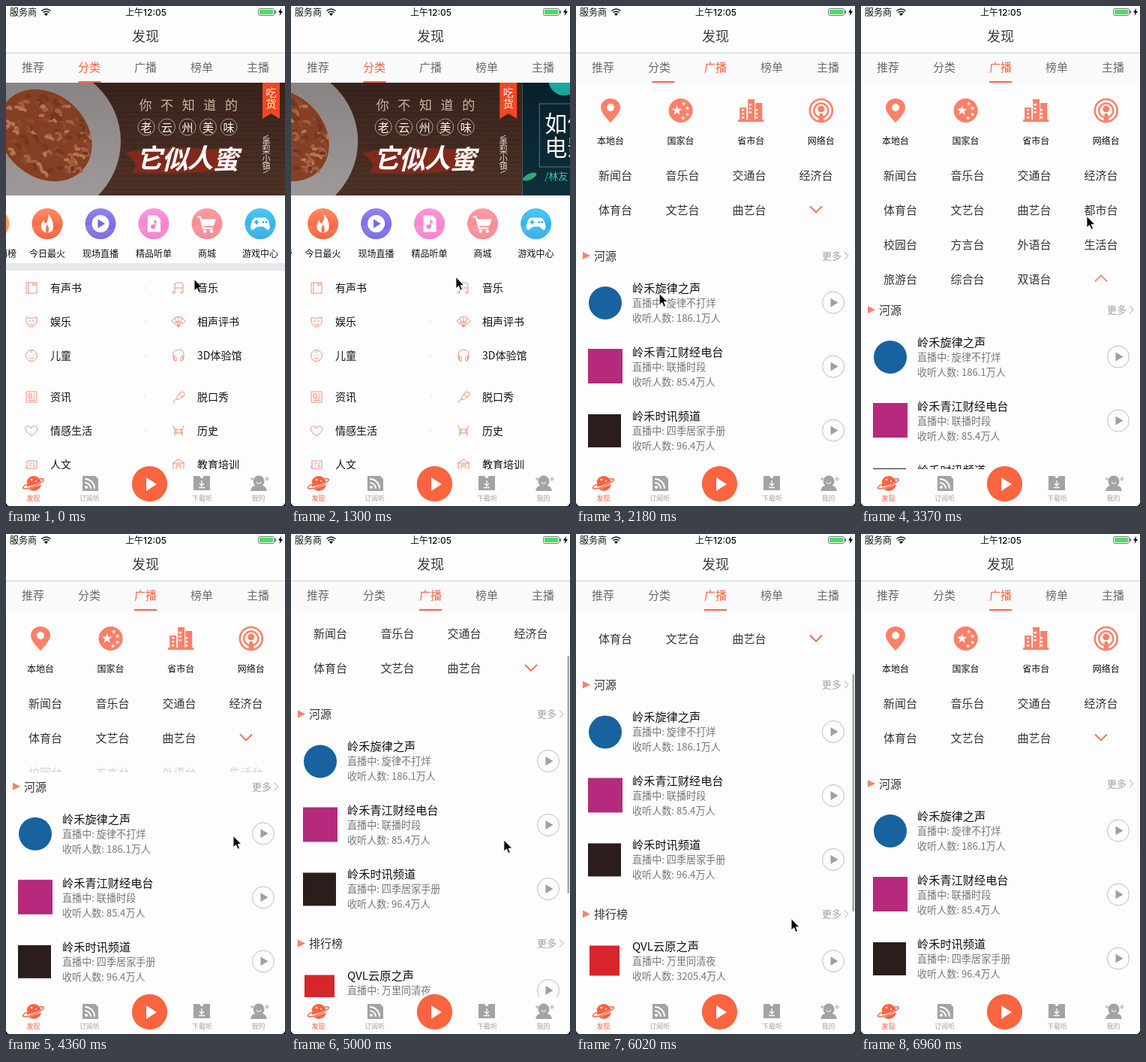
An HTML page that plays this animation: 372x665 px, repeating every 7060 ms.

```html
<!DOCTYPE html>
<html lang="zh">
<head>
<meta charset="utf-8">
<style>
html, body { margin: 0; width: 100%; height: 100%; overflow: hidden; background: #fdfdfd }
svg { display: block; font-family: "Noto Sans CJK SC", "Noto Sans CJK", sans-serif }
</style>
</head>
<body>
<svg id="stage" width="372" height="665" viewBox="0 0 372 665"></svg>
<script>
const LOOP = 7060, CORAL = '#fb643f', SOFT = '#fb8068', GRAY = '#a3a3a3';
const $ = id => document.getElementById(id);
const g = (x, y, body, attrs = '') => `<g transform="translate(${x} ${y})" ${attrs}>${body}</g>`;
const path = (d, attrs = '') => `<path d="${d}" ${attrs}/>`;
const circle = (x, y, r, attrs = '') => `<circle cx="${x}" cy="${y}" r="${r}" ${attrs}/>`;
const rect = (x, y, w, h, attrs = '') => `<rect x="${x}" y="${y}" width="${w}" height="${h}" ${attrs}/>`;
// y is the vertical middle of the glyphs
const text = (x, y, size, str, fill = '#111', attrs = '') =>
  `<text x="${x}" y="${(y + size * .38).toFixed(2)}" font-size="${size}" fill="${fill}" ${attrs}>${str}</text>`;
const mid = (x, y, size, str, fill, attrs = '') => text(x, y, size, str, fill, 'text-anchor="middle" ' + attrs);
const line = (color, w = 1) => `fill="none" stroke="${color}" stroke-width="${w}"`;
const grad = (id, a, b) => `<linearGradient id="${id}" x1="0" y1="0" x2="0" y2="1">
  <stop stop-color="${a}"/><stop offset="1" stop-color="${b}"/></linearGradient>`;
const clip = (id, x, y, w, h) => `<clipPath id="${id}">${rect(x, y, w, h)}</clipPath>`;

let seed = 7;
const rnd = () => (seed = seed * 16807 % 2147483647) / 2147483647;

// ---- category page ----
function foodBanner() {
  let s = rect(0, 102, 372, 150, 'fill="url(#wood)"');
  for (let y = 106; y < 252; y += 6)
    s += path(`M0 ${y}Q${90 + rnd() * 200} ${y + rnd() * 8 - 4} 372 ${y}`, line('#1c0f0a', 1 + rnd()) + ' opacity=".15"');
  s += '<ellipse cx="44" cy="180" rx="109" ry="104" fill="url(#plate)"/>';
  const tones = ['#a3603f', '#71371f', '#b5764f', '#8a4a2c'];
  let food = '<ellipse rx="68" ry="55" fill="#843f24"/>';
  for (let i = 0; i < 110; i++) {
    const a = rnd() * 6.28, r = Math.sqrt(rnd());
    const x = Math.cos(a) * r * 62, y = Math.sin(a) * r * 49;
    food += path(`M${x.toFixed(1)} ${y.toFixed(1)}q${(rnd() * 6).toFixed(1)} -4 ${(rnd() * 10).toFixed(1)} ${(rnd() * 8 - 4).toFixed(1)}`,
      line(tones[i % 4], 4) + ' stroke-linecap="round"');
  }
  s += `<g transform="translate(52 172) rotate(42)">${food}</g>`;
  [...'你不知道的'].forEach((c, i) => s += mid(186 + i * 28.6, 132, 17, c, '#d0b49e'));
  [...'老云州美味'].forEach((c, i) => s += circle(187 + i * 27.5, 161, 11, line('#cbb7a8', .8)) + mid(187 + i * 27.5, 161, 15, c, '#fff'));
  s += path('M158 196Q200 184 310 192Q300 206 312 214Q250 226 168 222Q180 208 158 196Z', 'fill="#8e2a1c" opacity=".8"');
  [...'它似人蜜'].forEach((c, i) => s += mid(191 + i * 34, 202 + i % 2 * 2, 35, c, '#fff', 'font-weight="900" font-style="italic"'));
  s += path('M342 102h23v48l-11.500-7-11.500 7z', 'fill="#f4471f"') + mid(353.500, 115, 14, '吃', '#fff') + mid(353.500, 130, 14, '货', '#fff');
  [...'墨梨小镇'].forEach((c, i) => s += mid(347, 181 + i * 10.700, 11, c, '#e6dcd6'));
  return s + path('M343 175l7-3M343 222l7-3', line('#e6dcd6', .9));
}

const filmBanner = () => rect(0, 102, 372, 150, 'fill="url(#night)"') +
  circle(56, 98, 21, 'fill="#17a79c"') +
  '<ellipse cx="10" cy="227" rx="10" ry="4" fill="#2fa878" transform="rotate(-25 10 227)"/>' +
  rect(23, 130, 320, 84, line('#6f868d', .8)) +
  text(30, 156, 30, '如何读懂', '#fff', 'font-weight="500"') + text(30, 188, 30, '电影语言', '#fff', 'font-weight="500"') +
  text(30, 226, 13, '/林友', '#35c9a0');

const white = 'fill="#fff"';
const shortcuts = [
  ['主播畅销榜', '#fbb56b', '#f98f45', ''],
  ['今日最火', '#ff8c66', '#f4502b', path('M1-13Q9-4 8 4Q8 11 1 12Q4 7 0 1Q-4 7-1 12Q-9 10-8 3Q-8-1-5-5Q-4-1-2 0Q3-6 1-13Z', white)],
  ['现场直播', '#8f86f2', '#6a5bda', circle(0, 0, 11.5, white) + path('M-3.500-6L6 0L-3.500 6Z', 'fill="#7467e2"')],
  ['精品听单', '#ff98da', '#f473c8', path('M-8-11H4L9-6V11H-8Z', white) + circle(-1, 4, 3, 'fill="#f680cd"') + path('M1.500 4V-4l3 3', line('#f680cd', 1.6))],
  ['商城', '#ff9ea3', '#f67c84', path('M-13-9h4l4 15H8', line('#fff', 2)) + path('M-8-6H12L9 3H-5Z', white) + circle(-3, 10, 2.2, white) + circle(6, 10, 2.2, white)],
  ['游戏中心', '#4fc7f6', '#1ba4e6', path('M-7-8H7Q11-7 13 4Q13 9 9 8L4 4H-4L-9 8Q-13 9-13 4Q-11-7-7-8Z', white) +
    path('M-8-2h6M-5-5v6', line('#2fb1ec', 2)) + circle(4, -2, 1.4, 'fill="#2fb1ec"') + circle(8, -2, 1.4, 'fill="#2fb1ec"')]
];
const shortcutRow = () => shortcuts.map(([name, a, b, icon], i) => {
  const x = i * 71 - 16;
  return grad('sc' + i, a, b) + g(x, 289.5, circle(0, 0, 20.5, `fill="url(#sc${i})"`) +
    path('M-20 4Q-8-2 2 5T20 3A20.500 20.500 0 0 1-20 4Z', 'fill="#fff" opacity=".12"') + icon) + mid(x, 329, 12, name);
}).join('');

const topics = [
  ['有声书', 'M-7-7H7V7H-7ZM-4-7V7M2-7v4l1.500-1 1.500 1v-4'],
  ['音乐', 'M-5 5V-4q0-3 3-3h5q3 0 3 3V5M-5 0H6M-8 6a1.500 1.500 0 1 0 3 0a1.500 1.500 0 1 0-3 0M3 6a1.500 1.500 0 1 0 3 0a1.500 1.500 0 1 0-3 0'],
  ['娱乐', 'M-7-6Q0-3 7-6V0Q5 6 0 7Q-5 6-7 0ZM-4-1h3M1-1h3M-3 3Q0 5 3 3'],
  ['相声评书', 'M0 7L-9-1Q0-13 9-1ZM0 7L-5-5M0 7V-7M0 7L5-5M-5 2Q0-3 5 2'],
  ['儿童', 'M-7.500 0a7.500 7.500 0 1 0 15 0a7.500 7.500 0 1 0-15 0M0-7v3M-3-1v1M3-1v1M-3 3Q0 5 3 3'],
  ['3D体验馆', 'M-6 6Q-10-8 0-8T6 6M-6 0q4 1 3 7h-2zM6 0q-4 1-3 7h2z'],
  ['资讯', 'M-7-7H7V7H-7ZM-4-4H0V0H-4ZM2-4h3M2-1h3M-4 2H5M-4 4.500H5'],
  ['脱口秀', 'M1-4a3.500 3.500 0 1 1 4 4Q2 3-2 4L-3 2Q-1-2 1-4L5 0M-3 3Q-9 6-5 8'],
  ['情感生活', 'M0 7Q-8 1-8-3Q-7-7-3-6Q-1-6 0-3Q1-6 3-6Q7-7 8-3Q8 1 0 7Z'],
  ['历史', 'M-7-7l2 5V7M7-7l-2 5V7M-5-2H5M-6 3H6M-3-2v5M3-2v5'],
  ['人文', 'M-6-5H7V5H-6ZM-6 5q-2 0-1-3M-3-2h4M-3 1h3M3-3v6l2-2'],
  ['教育培训', 'M-8-2L0-7L8-2M-7-2V7H7V-2ZM-3 7V2H3V7M-4 0H4']
];
const topicList = () => topics.map(([name, d], i) => {
  const right = i % 2, row = i >> 1, y = 375 + row * 45 + (row > 2 ? 10 : 0);
  return g(right ? 230 : 34, y, path(d, line('#f0856c', .9))) + text(right ? 255 : 59, y, 14, name) +
    (right ? '' : rect(185.500, y - 2, 1, 4, `fill="#ddd" ${row ? '' : 'id="dot"'}`));
}).join('');

// ---- radio page ----
const soft = `fill="${SOFT}"`;
const star = (x, y, r) => {
  let d = '';
  for (let i = 0; i < 10; i++) {
    const a = i * Math.PI / 5, q = i % 2 ? r * .4 : r;
    d += (i ? 'L' : 'M') + (x + Math.sin(a) * q).toFixed(1) + ' ' + (y - Math.cos(a) * q).toFixed(1);
  }
  return path(d + 'Z', white);
};
let windows = '';
for (let i = 0; i < 9; i++) windows += rect(-10 + i % 3 * 8.500 - (i % 3 ? 1 : 2), -2 + (i / 3 | 0) * 5 - (i % 3 == 1 ? 7 : 0), 3, 2.5, white);
const kinds = [
  ['本地台', path('M0 16Q-13 3-13-4A13 12 0 0 1 13-4Q13 3 0 16Z', soft) + circle(0, -4, 5, white)],
  ['国家台', circle(0, 0, 16, soft) + star(-5, 0, 7) + star(4, -9, 3) + star(9, -3, 3) + star(9, 5, 3) + star(3, 10, 3)],
  ['省市台', path('M-17 15V12H-15V-4H-6V12H-4V-15H5V12H6V-10H15V12H17V15Z', soft) + windows],
  ['网络台', circle(0, 0, 15, line(SOFT, 2.6)) + circle(0, 0, 9.5, line(SOFT, 2.4)) + circle(0, -2, 4.5, soft) + path('M-4 16L-2 4H2L4 16Z', soft)]
];
const cols = [52.5, 142, 231, 320];
const gridRow = (names, y) => names.map((n, i) => mid(cols[i], y, 15, n, '#333')).join('');
const heading = (name, y) => path(`M9 ${y - 5}l10 5-10 5z`, soft) + text(24, y, 15, name, '#333') +
  text(328, y, 13, '更多', GRAY) + path(`M358 ${y - 5}l5 5-5 5`, line(GRAY));
const logos = [
  circle(39, 20, 22, 'fill="#17629f"'), rect(16, -4, 46, 46, 'fill="#b52a7c"'), rect(16, -2, 44, 44, 'fill="#2b1d1c"'),
  rect(18, -1, 40, 40, 'fill="#d8252c"'), rect(18, -1, 40, 40, 'fill="#1d1a1a"'), rect(18, -1, 40, 40, 'fill="#d8342a"')
];
const station = (i, y, name, show, count) => g(0, y, logos[i] + text(75, 0, 15.2, name) +
  text(75, 20, 13.1, '直播中: ' + show, '#777') + text(75, 40, 13.1, `收听人数: ${count}万人`, '#777') +
  circle(343, 19.5, 14.5, line('#bdbdbd')) + path('M339.500 13.500l10 6-10 6z', 'fill="#a0a0a0"'));

const radioPage = () => kinds.map(([n, icon], i) => g(46 + i * 93.600, 139, icon) + mid(46 + i * 93.600, 179, 12, n)).join('') +
  gridRow(['新闻台', '音乐台', '交通台', '经济台'], 225) + gridRow(['体育台', '文艺台', '曲艺台'], 271) +
  `<g id="extra" clip-path="url(#gridClip)">${mid(320, 271, 15, '都市台', '#333', 'id="eighth"')}
  ${gridRow(['校园台', '方言台', '外语台', '生活台'], 317)}${gridRow(['旅游台', '综合台', '双语台'], 363)}</g>` +
  `<g id="arrow">${path('M-8-4L0 4L8-4', line(CORAL, 1.8))}</g><g id="lists">` +
  heading('河源', 332) +
  station(0, 375, '岭禾旋律之声', '旋律不打烊', '186.1') +
  station(1, 460, '岭禾青江财经电台', '联播时段', '85.4') +
  station(2, 545, '岭禾时讯频道', '四季居家手册', '96.4') +
  heading('排行榜', 637) +
  station(3, 680, 'QVL云原之声', '万里同清夜', '3205.4') +
  station(4, 765, 'QZTV48时讯频道', '子夜时讯', '562.9') +
  station(5, 850, 'QVL旋律之声', '静夜', '1257.4') + '</g>';

// ---- fixed bars ----
const header = () => rect(0, 0, 372, 102, 'fill="#fdfdfd"') + rect(0, 63, 372, 39, 'fill="#fafafa"') +
  text(5, 8, 12, '服务商') + path('M47.500 6.500q6-5 12 0M49.500 8.700q4-3 8 0', line('#111', 1.6)) + path('M51 10.500q2.500-2 5 0l-2.500 2.500z') +
  mid(186.500, 8, 12, '上午12:05', '#111', 'font-weight="500" style="font-family:Inter,\'Noto Sans CJK SC\',sans-serif"') +
  rect(336.500, 3.500, 21, 9, 'rx="2" ' + line('#555', .8)) + rect(338, 5, 18, 6, 'fill="#4cd964"') + rect(358.500, 6, 1.5, 4, 'fill="#555"') +
  path('M367 3l-4 5.500h2.500l-1 4.500 4.500-6h-2.500z') +
  mid(186, 40, 18, '发现', '#3c3c3c') + rect(0, 62, 372, 1, 'fill="#cfcfcf"') +
  ['推荐', '分类', '广播', '榜单', '主播'].map((n, i) => mid(36 + i * 75, 81.5, 15, n, '#6b6b6b', `id="tab${i}"`)).join('') +
  rect(0, 100, 30, 2, `id="underline" fill="${CORAL}"`);

const gray = `fill="${GRAY}"`;
const footer = () => circle(191.500, 636, 27, 'fill="#fdfdfd"') + rect(0, 616, 372, 49, 'fill="#fdfdfd"') +
  g(36, 635, circle(1, 0, 10, `fill="${CORAL}"`) + path('M-14 6Q-14 1-8-1M15-6Q14 0 0 4T-14 6', line('#fff', 3)) +
    path('M-9 1Q-17 7-11 7Q2 6 13-3Q17-7 9-6', line(CORAL, 1.5)) + circle(-2, -5, 1.3, white) + circle(4, -3, 1, white)) +
  g(112, 635, path('M-10-10H7L11-6V10H-10Z', gray) + circle(-5, 5, 2, white) + path('M-7-1A8 8 0 0 1 1 7M-7-6A13 13 0 0 1 6 7', line('#fff', 2))) +
  g(261, 635, path('M-11-10H-3L-1-7H1L3-10H11V9H-11Z', gray) + path('M0-4V3M-3 0L0 3L3 0M-4 5.500H4', line('#fff', 1.3))) +
  g(337, 635, circle(0, -3, 7.5, gray) + path('M-11 10Q-9 2-4 3H4Q9 2 11 10Z', gray) + path('M-3-2Q0 3 3-2', line('#fff', 1.2)) +
    path('M11-9v6M8-6h6M-9-8v4M-11-6h4', line(GRAY))) +
  ['发现', '订阅听', '', '下载听', '我的'].map((n, i) => mid(36.500 + i * 75, 655, 9, n, i ? GRAY : CORAL)).join('') +
  circle(191.500, 635.500, 23.600, `fill="${CORAL}"`) + path('M187 627l14 9-14 9z', white) +
  path('M0 661V665H4Q1 664 0 661ZM372 661V665H368Q371 664 372 661Z');

$('stage').innerHTML = `<defs>${grad('wood', '#38241d', '#4f3226')}${grad('plate', '#85807f', '#a39e9d')}${grad('night', '#08202b', '#0e2f3b')}
  ${clip('view', 0, 102, 372, 514)}${clip('bannerClip', 0, 102, 372, 150)}
  <clipPath id="gridClip"><rect id="gridRect" x="0" y="210" width="372" height="0"/></clipPath></defs>` +
  rect(0, 0, 372, 665, 'fill="#fdfdfd"') +
  `<g clip-path="url(#view)"><g id="category"><g clip-path="url(#bannerClip)"><g id="banner">${g(372, 0, filmBanner())}
  <g clip-path="url(#bannerClip)">${foodBanner()}</g></g></g>
  <g id="shortcuts">${shortcutRow()}</g>${rect(0, 342, 372, 10, 'id="gap" fill="#e6e8ea"')}${topicList()}</g>
  <g id="radio">${radioPage()}</g></g>` +
  rect(368.500, 105, 2.5, 316, 'id="thumb" rx="1.2" fill="#000"') + header() + footer() +
  `<g id="cursor">${path('M0-.6V14.800L3.600 11.500L6 17.200L8.600 16.100L6.200 10.600H11Z', 'stroke="#fff" stroke-width="1"')}</g>`;

// keys: [time, value, ease-out power]; the power shapes the way to that key, 0 is ease in and out
const inOut = u => u < .5 ? 2 * u * u : 1 - 2 * (1 - u) ** 2;
function at(t, keys) {
  if (t <= keys[0][0]) return keys[0][1];
  for (let i = 1; i < keys.length; i++) {
    const [t0, a] = keys[i - 1], [t1, b, e = 1] = keys[i];
    if (t < t1) {
      const u = (t - t0) / (t1 - t0);
      return a + (b - a) * (e ? 1 - (1 - u) ** e : inOut(u));
    }
  }
  return keys[keys.length - 1][1];
}

const pointer = [
  [360, 251, 364], [640, 288, 338, 0], [820, 288, 338], [1300, 220, 361], [1480, 214, 364, 2], [1560, 214, 364],
  [1820, 122, 381], [2180, 111, 383, 2], [2240, 119, 382], [2960, 292, 277, 0], [3010, 301, 280], [3400, 301, 280],
  [3840, 319, 357, 0], [3950, 319, 359], [4130, 319, 359], [4360, 303, 402], [4830, 287, 500, 0], [4890, 287, 500],
  [5100, 281, 325], [5600, 281, 325], [6020, 287, 512], [6300, 286, 560], [6750, 290, 670]
];
const pointerX = pointer.map(([t, x, , e]) => [t, x, e]);
const pointerY = pointer.map(([t, , y, e]) => [t, y, e]);

const set = (id, name, value) => $(id).setAttribute(name, value);
const move = (id, x, y) => set(id, 'transform', `translate(${x.toFixed(2)} ${y.toFixed(2)})`);

function draw(t) {
  const page = at(t, [[1560, 0], [1820, 92], [2120, 372, 2.5]]);
  const open = at(t, [[3190, 0], [3460, 1, 0], [4130, 1], [4400, 0, 0]]);
  const scroll = at(t, [[4890, 0], [5100, 175], [5380, 322, 2], [5540, 313, 2], [5600, 313], [6020, 132], [6600, 0, 2]]);
  const expanded = t >= 3190 && t < 4130;

  move('banner', -at(t, [[1230, 0], [1300, 61, .6], [1480, 372, 1.6]]), 0);
  move('shortcuts', -at(t, [[820, 0], [1300, 12.5], [1480, 0, 2]]), 0);
  for (const id of ['gap', 'dot']) set(id, 'opacity', t < 820 ? 1 : 0);
  move('category', -page, 0);

  move('radio', 372 - page, -scroll);
  move('lists', 0, open * 92);
  set('gridRect', 'height', 103 + open * 92);
  set('extra', 'opacity', Math.min(1, open * 5));
  set('eighth', 'opacity', expanded ? 1 : 0);
  set('arrow', 'transform', expanded ? 'translate(320 362.3) scale(1 -1)' : 'translate(320 270.3)');
  set('arrow', 'opacity', expanded ? open : 1);

  const over = Math.max(0, scroll - 313);
  set('thumb', 'y', 105 + .617 * (scroll - over) + 2 * over);
  set('thumb', 'height', 316 - 2 * over);
  set('thumb', 'opacity', at(t, [[4890, 0], [4980, .35], [6650, .35], [6960, .03]]));

  set('underline', 'x', at(t, [[2120, 96.5], [2180, 101], [2240, 118], [2300, 145], [2430, 171, 2]]));
  set('tab1', 'fill', t < 2000 ? CORAL : '#6b6b6b');
  set('tab2', 'fill', t < 2000 ? '#6b6b6b' : CORAL);
  move('cursor', at(t, pointerX), at(t, pointerY));
}

function frame(now) {
  draw(now % LOOP);
  requestAnimationFrame(frame);
}
draw(0);
requestAnimationFrame(frame);
</script>
</body>
</html>
```
